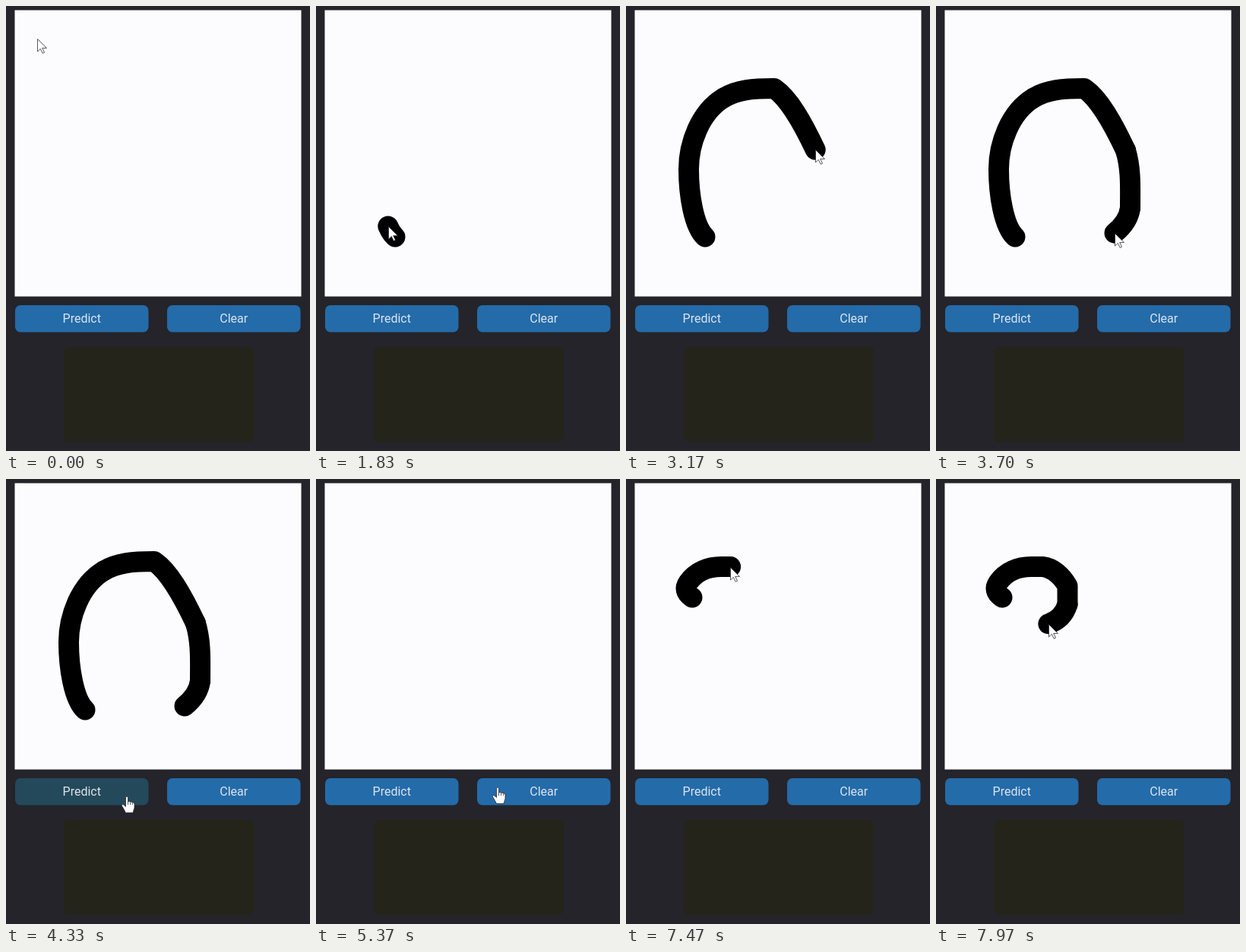
Write an HTML page with a canvas that moves like this. It is 400 px wide and 586 px high and loops after 8000 ms.

```html
<!DOCTYPE html>
<html lang="en">
<head>
<meta charset="utf-8">
<title>Digit drawing pad</title>
<style>
html, body { margin: 0; width: 100%; height: 100%; overflow: hidden; background: #24242a; }
canvas { display: block; }
</style>
</head>
<body>
<canvas id="stage" width="400" height="586"></canvas>
<script>
const ctx = document.getElementById('stage').getContext('2d');
const LOOP = 8000, TICK = 100 / 3, BRUSH = 27;
const PREDICTED = 4570, CLEARED = 5330;

const predict = { label: 'Predict', x: 12, press: [4470, PREDICTED] };
const clear = { label: 'Clear', x: 212, press: [CLEARED, 5470] };
const buttons = [predict, clear];
const BUTTON = { y: 394, w: 175.5, h: 35.5 };

// The pointer runs each leg at even speed and rests until the next one.
const legs = [];
let start = { x: 41, y: 43 };

function addLeg(from, to, route, ink) {
  const path = document.createElementNS('http://www.w3.org/2000/svg', 'path');
  const d = `M${start.x} ${start.y}${route}`;
  path.setAttribute('d', d);
  const length = path.getTotalLength();
  legs.push({ from, to, path, length, ink, shape: new Path2D(d) });
  start = path.getPointAtLength(length);
}
const move = (from, to, x, y) => addLeg(from, to, `L${x} ${y}`, false);
const drag = (from, to, curve) => addLeg(from, to, curve, true);

move(0, 360, 104, 311);
move(1430, 1570, 104, 304);
drag(1770, 2530, 'C89 290 82.5 248 82.5 215S97 140 128.5 121');
drag(2530, 3170, 'C147 110 168 108.5 195 108.5C215 122 233 155 249.5 190');
drag(3170, 3430, 'C257 215 255.5 240 255.5 266');
drag(3430, 3700, 'C254 278 246 290 235 299');
move(3870, 3900, 178, 410);
move(4070, 4130, 159, 418);
move(4830, 4870, 198, 416);
move(5100, 5170, 239, 406);
move(5640, 5700, 150, 266);
move(6170, 6240, 117, 165);
move(6740, 6770, 92, 151);
move(6960, 7010, 87, 156);
drag(7010, 7840, 'C78 150 77 143 82 136C92 122 108 115.5 125 115.5H140C154 117 166 128 173 141V165');
drag(7840, 7970, 'C169 178 160 187 147 191');

const travelled = (leg, t) => leg.length * Math.min(1, (t - leg.from) / (leg.to - leg.from));
const during = ([from, to], t) => t >= from && t < to;

function pointerAt(t) {
  const leg = legs.findLast(({ from }) => from <= t);
  return leg.path.getPointAtLength(travelled(leg, t));
}

function isOver(button, { x, y }) {
  return x >= button.x && x < button.x + BUTTON.w && y >= BUTTON.y && y < BUTTON.y + BUTTON.h;
}

function roundedBox(x, y, w, h, color) {
  ctx.fillStyle = color;
  ctx.beginPath();
  ctx.roundRect(x, y, w, h, 7);
  ctx.fill();
}

function centeredText(text, x, baseline, size) {
  ctx.font = `${size}px Roboto, sans-serif`;
  ctx.textAlign = 'center';
  ctx.fillStyle = '#dce4ee';
  ctx.fillText(text, x, baseline);
}

function drawButton(button, hovered, t) {
  const dimmed = hovered && !during(button.press, t);
  roundedBox(button.x, BUTTON.y, BUTTON.w, BUTTON.h, dimmed ? '#24495a' : '#246ba9');
  centeredText(button.label, button.x + BUTTON.w / 2, 417, 16);
}

function drawInk(t) {
  const wipedAt = t < CLEARED ? 0 : CLEARED;
  ctx.save();
  ctx.strokeStyle = '#000';
  ctx.lineWidth = BRUSH;
  ctx.lineCap = ctx.lineJoin = 'round';
  for (const leg of legs) {
    if (!leg.ink || leg.from > t || leg.from < wipedAt) continue;
    ctx.setLineDash([travelled(leg, t), leg.length + BRUSH]);
    ctx.stroke(leg.shape);
  }
  ctx.restore();
}

const arrowShape = new Path2D('M.5 .5V17L4.3 13.4L7.2 19.3L9.5 18.2L6.7 12.4H12.5Z');
const handShape = new Path2D('M-1.5 1Q0 -1 1.5 1V7Q3 6 4.5 7.3Q6 6.6 7.3 8Q10 7.5 10 10V15Q9 18 8 21.5H-1.5Q-3 18 -6.5 12.5Q-6.5 9.5 -4 11L-1.5 13.5Z');
const knuckles = new Path2D('M1.5 7V11M4.5 7.5V11M7.3 8.5V11');

function drawPointer({ x, y }, hand) {
  const shape = hand ? handShape : arrowShape;
  ctx.save();
  ctx.translate(Math.round(x), Math.round(y));
  ctx.fillStyle = '#fff';
  ctx.strokeStyle = '#2b2b38';
  ctx.lineWidth = 0.8;
  ctx.fill(shape);
  ctx.stroke(shape);
  if (hand) ctx.stroke(knuckles);
  ctx.restore();
}

function draw(t) {
  ctx.fillStyle = '#24242a';
  ctx.fillRect(0, 0, 400, 586);
  ctx.fillStyle = '#fcfcfe';
  ctx.fillRect(11.5, 5.5, 377, 377);
  roundedBox(76, 449, 250, 125, '#24241a');
  drawInk(t);

  const pointer = pointerAt(t);
  const hovered = buttons.find(button => isOver(button, pointer));
  for (const button of buttons) drawButton(button, button === hovered, t);
  if (during([PREDICTED, CLEARED], t)) centeredText('0', 201, 520, 24);
  drawPointer(pointer, Boolean(hovered));
}

function frame(now) {
  const step = Math.floor((now % LOOP + 5) / TICK);
  draw(step * TICK % LOOP);
  requestAnimationFrame(frame);
}
requestAnimationFrame(frame);
</script>
</body>
</html>
```
